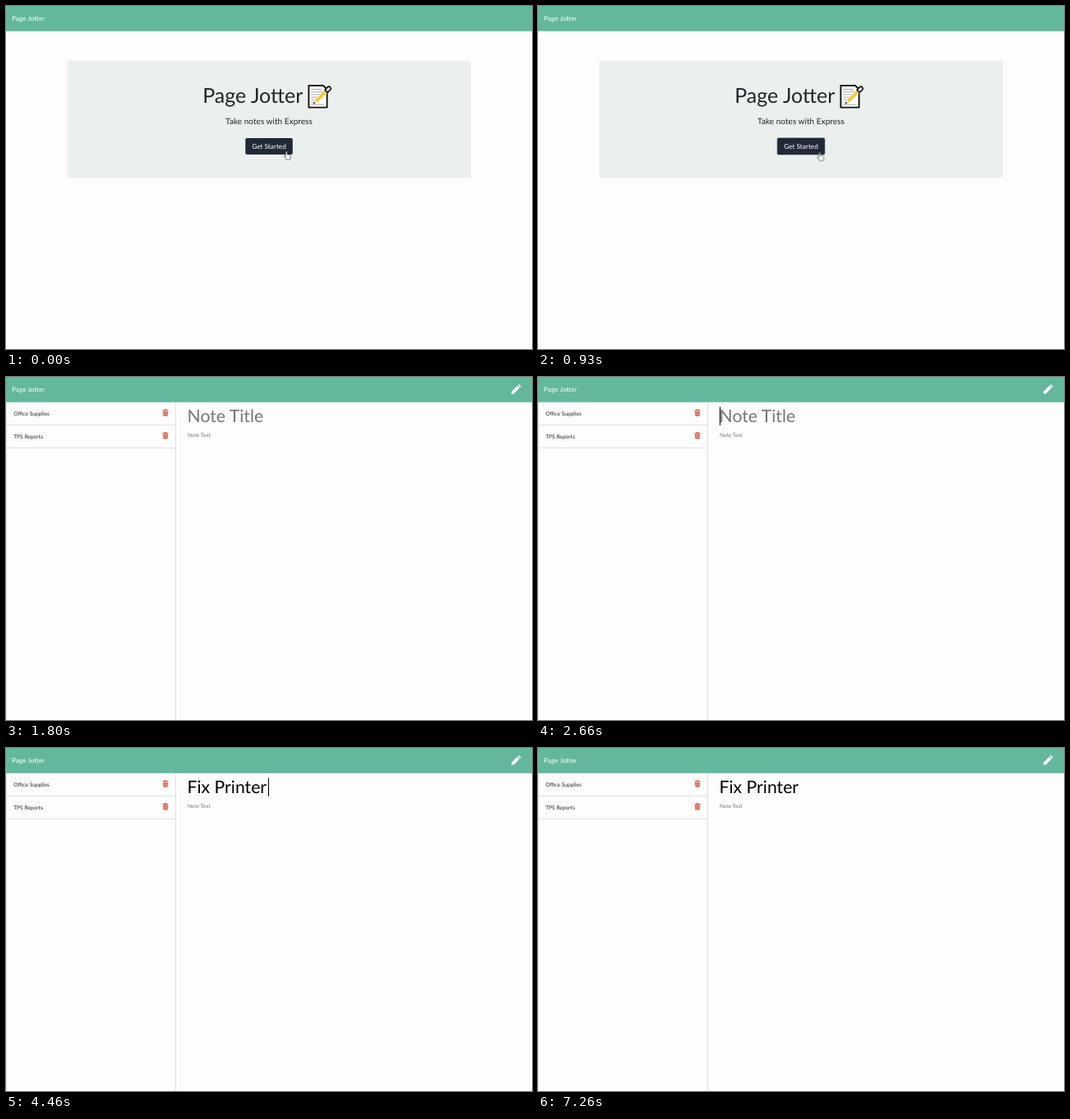
An HTML page for the animation above (8000 ms loop, 640 by 418 pixels).

```html
<!DOCTYPE html>
<html lang="en">
<head>
<meta charset="utf-8">
<title>Page Jotter</title>
<style>
  html, body { margin: 0; width: 100%; height: 100%; overflow: hidden; background: #fdfdfd; }
  svg { display: block; width: 100vw; height: 100vh; }
  text { font-family: Lato, sans-serif; text-rendering: geometricPrecision; white-space: pre; }
  .mid { text-anchor: middle; }
  .brand, .btn { font-size: 8.25px; fill: #fff; }
  .item { font-size: 6.65px; fill: #212529; }
  .title { font-size: 21.2px; }
  .hint { fill: #757575; }
  .rule { stroke: #dfe2e2; stroke-width: 1; }

  .home, .notes, .list, .ask, .typed, .caret, .hand { animation: 8s step-end infinite; }
  .home { animation-name: home; }
  .notes { animation-name: notes; }
  .list { animation-name: list; }
  .ask { animation-name: ask; }
  .typed { animation-name: typed; }
  .caret { animation-name: caret; }
  .hand { animation-name: hand; }
  .drift { animation: drift 8s linear infinite; }
  .ring { animation: ring 8s linear infinite; }

  @keyframes home { 0% { opacity: 1 } 14.05%, 100% { opacity: 0 } }
  @keyframes notes { 0% { opacity: 0 } 14.05%, 100% { opacity: 1 } }
  @keyframes list { 0% { opacity: 0 } 14.95%, 100% { opacity: 1 } }
  @keyframes ask { 0% { opacity: 1 } 55.7%, 100% { opacity: 0 } }
  @keyframes typed { 0% { opacity: 0 } 55.7%, 100% { opacity: 1 } }
  @keyframes hand { 0% { opacity: 1 } 22.45%, 100% { opacity: 0 } }
  @keyframes drift {
    0%, .75% { transform: none }
    4.1%, 100% { transform: translate(1.5px, 1.2px) }
  }
  @keyframes ring { 0%, 9.1% { opacity: 0 } 11.5%, 100% { opacity: 1 } }
  @keyframes caret {
    0% { opacity: 0; transform: none }
    33.2% { opacity: 1; transform: none }
    39.95% { opacity: 0; transform: none }
    46.55% { opacity: 1; transform: none }
    52.45% { opacity: 0; transform: none }
    55.7% { opacity: 1; transform: translateX(98px) }
    62.45% { opacity: 0; transform: translateX(98px) }
    69.05% { opacity: 1; transform: translateX(98px) }
    75.7%, 100% { opacity: 0; transform: translateX(98px) }
  }
</style>
</head>
<body>
<svg viewBox="0 0 640 418">
  <defs>
    <g id="bin">
      <path d="M0 1.2H2.1L2.6.3H4.6L5.1 1.2H7.2V2.2H0Z"/>
      <path d="M.6 2.8H6.6L6.3 8.2Q6.2 8.9 5.5 8.9H1.7Q1 8.9.9 8.2Z"/>
      <path d="M2.2 3.9V7.7M3.6 3.9V7.7M5 3.9V7.7" stroke="#f3c9c2" stroke-width=".5"/>
    </g>
  </defs>

  <rect width="640" height="418" fill="#fdfdfd"/>
  <rect width="640" height="30.7" fill="#62b79d"/>
  <text class="brand" x="7" y="18.4">Page Jotter</text>

  <g class="home">
    <rect x="74.5" y="66.6" width="491" height="142.8" rx="2" fill="#ebefee"/>
    <text class="mid" x="300.3" y="118.4" font-size="25" fill="#212529">Page Jotter</text>
    <text class="mid" x="320" y="144.3" font-size="10.1" fill="#212529">Take notes with Express</text>

    <g stroke-linejoin="round">
      <path d="M368.4 97H386L390.6 101.6V123.6H368.4Z" fill="#fff" stroke="#111" stroke-width="1.9"/>
      <path d="M371.4 101.5H384M371.4 104.7H386M371.4 107.9H385M371.4 111.1H381M371.4 114.3H378M371.4 117.5H376M371.4 120.3H387" stroke="#a9adad" stroke-width="1"/>
      <path d="M373.8 119.6L376 114.2L389.6 100.6L392.8 103.8L379.2 117.4Z" fill="#f5c842" stroke="#fff" stroke-width=".6"/>
      <path d="M373.8 119.6L376 114.2L379.2 117.4Z" fill="#f4dfb5"/>
      <path d="M373.6 119.8L374.8 117L376.4 118.6Z" fill="#222"/>
      <path d="M388 102.2L391.2 98.9Q393 97.4 394.6 98.9Q396 100.6 394.6 102.2L391.3 105.4Z" fill="#d9dddd" stroke="#111" stroke-width="1.6"/>
    </g>

    <rect class="ring" x="290.6" y="160.3" width="58.9" height="21.5" rx="2.4" fill="#8a9299"/>
    <rect x="291.3" y="161" width="57.5" height="20.1" rx="1.8" fill="#212936"/>
    <text class="btn mid" x="320" y="173.8">Get Started</text>
  </g>

  <g class="notes">
    <path class="rule" d="M.5 31V418M206.5 31V418"/>
    <path transform="translate(615 9)" fill="#fff" d="M0 8.7L6.9 1.8L9.7 4.6L2.8 11.5H0ZM7.6 1.1L8.5.2Q9 -.3 9.6.2L11.3 1.9Q11.8 2.4 11.3 3L10.4 3.9Z"/>
    <text class="title hint ask" x="220.6" y="55.2">Note Title</text>
    <text class="title typed" x="220.6" y="55.2">Fix Printer</text>
    <text class="hint" x="221" y="72.8" font-size="6.5">Note Text</text>
    <rect class="caret" x="221" y="36.5" width="1" height="22.3"/>
  </g>

  <g class="list">
    <path class="rule" d="M0 58.5H206M0 86.5H206"/>
    <text class="item" x="9.2" y="47">Office Supplies</text>
    <text class="item" x="9.2" y="74.8">TPS Reports</text>
    <g fill="#d4604f">
      <use href="#bin" x="190.4" y="38.9"/>
      <use href="#bin" x="190.4" y="66.7"/>
    </g>
  </g>

  <g class="hand">
    <g class="drift">
      <path transform="translate(338 177)" fill="#fff" stroke="#555" stroke-width=".8" stroke-linejoin="round"
        d="M2.4 6.4V1.2Q2.4.3 3.2.3T4 1.2V4Q5.2 3.4 5.6 4.3Q6.7 3.9 7 4.8Q8.2 4.6 8.2 5.8V7.6Q8.2 9 7.4 10.2H3.2Q2 8.6.6 6.8Q.2 5.6 1.3 5.6Z"/>
    </g>
  </g>
</svg>
</body>
</html>
```
